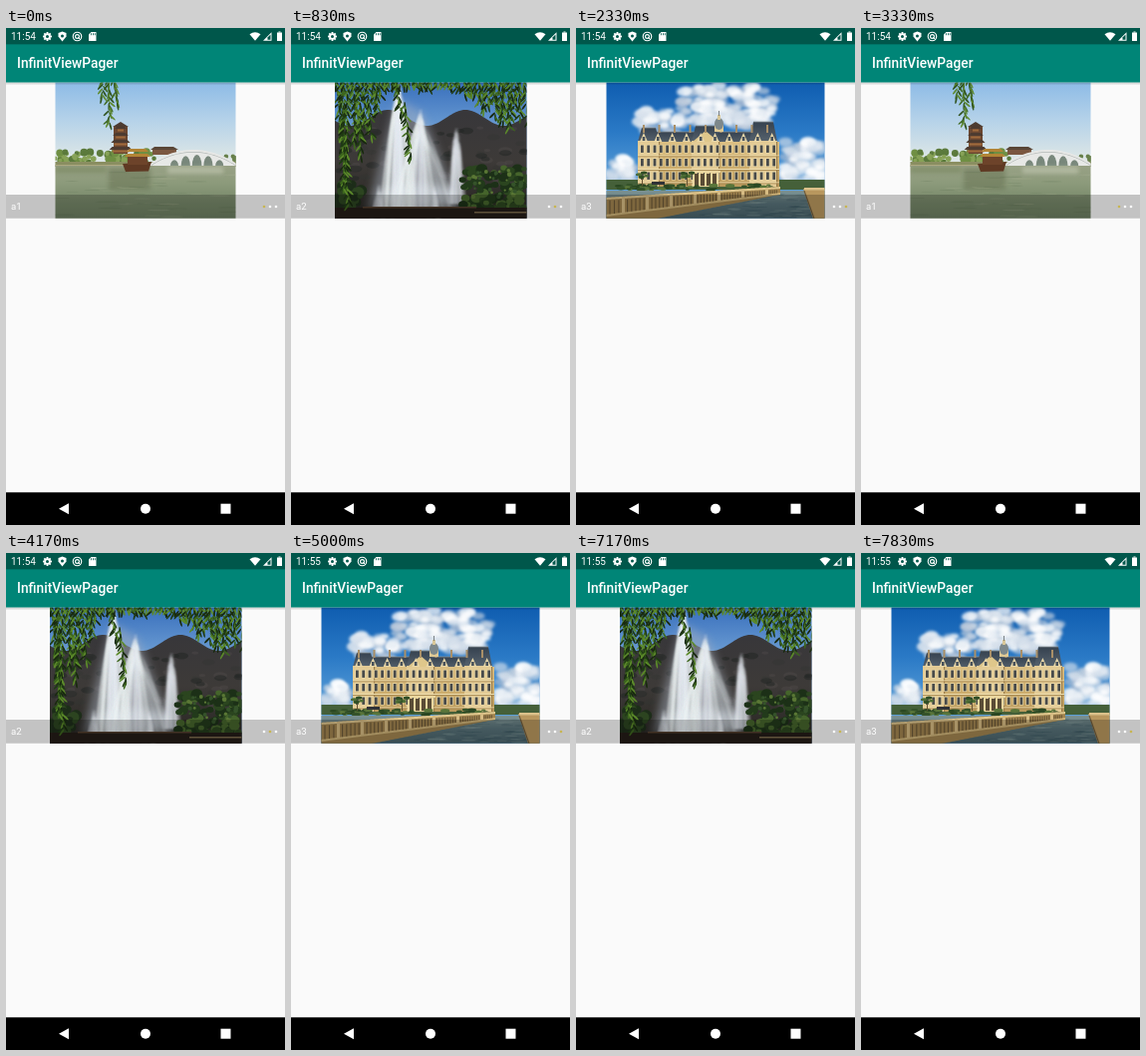
An HTML page with a canvas that plays this animation: 280x498 px, repeating every 8 s.

```html
<!DOCTYPE html>
<html lang="en">
<head>
<meta charset="utf-8">
<title>InfinitViewPager</title>
<style>
html, body { margin: 0; width: 100%; height: 100%; overflow: hidden; background: #fafafa; }
#stage { position: relative; width: 280px; height: 498px; overflow: hidden; font-family: Roboto, sans-serif; color: #fff; }
canvas { position: absolute; left: 0; top: 0; }
span { position: absolute; line-height: 16px; white-space: pre; }
#clock { left: 5px; top: 1px; font-size: 10px; }
#title { left: 11px; top: 27px; font-size: 13.75px; font-weight: 500; }
#label { left: 5px; top: 170.5px; font-size: 9.6px; }
</style>
</head>
<body>
<div id="stage">
  <canvas id="view" width="280" height="498"></canvas>
  <span id="clock">11:54</span>
  <span id="title">InfinitViewPager</span>
  <span id="label">a1</span>
</div>
<script>
const W = 280, H = 498;
const DP = W / 411;
const STATUS = 24 * DP, TOP = 80 * DP, BOTTOM = 280 * DP, STRIP = 167, NAV = H - 48 * DP;
const LOOP = 8000, FPS = 6, FIRST = 545, PERIOD = 980, SLIDE = 200, MINUTE = 5000;
const DARK = '#00574b';
const byId = id => document.getElementById(id);
const view = byId('view').getContext('2d');
let g = view;

function rect(color, x, y, w, h) {
  g.fillStyle = color;
  g.fillRect(x, y, w, h);
}
function poly(color, ...p) {
  g.fillStyle = color;
  g.beginPath();
  for (let i = 0; i < p.length; i += 2) g.lineTo(p[i], p[i + 1]);
  g.fill();
}
function oval(color, x, y, rx, ry = rx, angle = 0) {
  g.fillStyle = color;
  g.beginPath();
  g.ellipse(x, y, rx, ry, angle, 0, 7);
  g.fill();
}
function line(color, width, x0, y0, x1, y1) {
  g.strokeStyle = color;
  g.lineWidth = width;
  g.beginPath();
  g.moveTo(x0, y0);
  g.lineTo(x1, y1);
  g.stroke();
}
function repeat(n, draw) {
  for (let i = 0; i < n; i++) draw(i);
}
function shade(y0, y1, ...colors) {
  const s = g.createLinearGradient(0, y0, 0, y1);
  colors.forEach((c, i) => s.addColorStop(i / (colors.length - 1), c));
  return s;
}
function blurred(px, draw) {
  g.save();
  g.filter = `blur(${px}px)`;
  draw();
  g.restore();
}
function random(seed) {
  seed *= 7919;
  return () => (seed = (seed * 16807) % 2147483647) / 2147483647;
}
// Fills between two curves over a range of x
function band(color, x0, x1, top, bottom) {
  g.fillStyle = color;
  g.beginPath();
  for (let x = x0; x <= x1; x++) g.lineTo(x, top(x));
  for (let x = x1; x >= x0; x--) g.lineTo(x, bottom(x));
  g.fill();
}
function scatter(n, colors, x, y, w, h, rx, ry = rx) {
  const r = random(n + x);
  repeat(n, i => {
    const k = 0.5 + r() * 0.7;
    oval(colors[i % colors.length], x + r() * w, y + r() * h, rx * k, ry * k);
  });
}
// A hanging twig whose narrow leaves droop to both sides
function willow(x, y, length, drift, colors) {
  const r = random(x + length);
  for (let d = 0, i = 0; d < length; d += 2.2, i++) {
    const angle = (r() - 0.5) * 1.8;
    oval(colors[i % colors.length], x + drift * d + Math.sin(angle) * 4, y + d, 0.9, 4, -angle);
  }
}

function lake() {
  rect(shade(TOP, 130, '#8dbbe6', '#b5d2e9', '#dce6e6'), 49, 54, 182, 84);
  scatter(60, ['#6f8f43', '#87a257', '#5b7a3c'], 49, 124, 100, 11, 3.5);
  scatter(18, ['#7d8c60', '#67804b'], 196, 128, 36, 7, 3);
  rect('#8b8f62', 49, 134, 182, 5);
  rect('#b4ad86', 49, 137, 95, 1.5);

  rect('#6b4731', 108, 99, 14, 27);
  repeat(4, i => {
    const y = 99 + i * 7, half = 6 + i * 1.8;
    poly('#4d3b30', 115 - half, y + 2, 118 - half, y - 1, 112 + half, y - 1, 115 + half, y + 2);
    rect('#a06b3c', 118 - half, y + 2.5, half * 2 - 6, 2);
  });
  poly('#4d3b30', 107, 99, 115, 94, 123, 99);
  rect('#7b5740', 147, 122, 24, 5);
  poly('#594536', 145, 122, 149, 119, 168, 119, 173, 122);

  const deck = x => 122 + (x - 188) ** 2 / 135;
  band('#e7e8e6', 143, 231, deck, () => 138);
  repeat(5, i => {
    const off = (i - 2) ** 2;
    oval('#78877b', 169 + i * 11.3, 138, 4.8 - off * 0.2, 11 - off * 1.3);
  });
  band('#b4b9b7', 146, 231, x => deck(x) + 2, x => deck(x) + 2.7);

  rect(shade(138, BOTTOM, '#98a185', '#8c9a7b', '#78896a', '#6b7d60'), 49, 138, 182, 53);
  blurred(2, () => {
    rect('#5d664866', 103, 140, 42, 22);
    rect('#d0d5c077', 162, 139, 56, 7);
    rect('#66784a66', 49, 139, 52, 6);
  });
  scatter(45, ['#b2bb9b33', '#53674533'], 49, 143, 182, 46, 10, 0.6);

  poly('#5f3923', 117, 136, 146, 134, 143, 143.5, 120, 144);
  rect('#6d432a', 122, 127, 20, 10);
  repeat(2, i => poly('#b28435', 121 - i * 2, 124 + i * 5, 124 - i * 2, 121 + i * 5,
    140 + i * 2, 121 + i * 5, 143 + i * 2, 124 + i * 5));

  const leaf = ['#416b25', '#5f8a32', '#315420'];
  repeat(3, i => willow(98 + i * 5, TOP, [18, 46, 26][i], i * 0.12 - 0.1, leaf));
}

// Water thrown up at one point, spreading as it falls
function plume(x, top, base, spread, n) {
  const r = random(x);
  g.strokeStyle = '#f0f5fa2c';
  g.lineWidth = 2.4;
  repeat(n, () => {
    const u = r() + r() - 1, y = top + Math.abs(u) * 25 + r() * 20;
    g.beginPath();
    g.moveTo(x + u * 5, y);
    g.quadraticCurveTo(x + u * spread * 0.6, y + 20, x + u * spread, base);
    g.stroke();
  });
}

function fountain() {
  rect(shade(TOP, 100, '#3970bd', '#6a9bd2'), 44, 54, 193, 137);
  const ridge = x => 90 - 8 * Math.cos((x - 175) / 12.3);
  band(shade(85, 180, '#38373a', '#3d3a38', '#2a2824'), 44, 237, ridge, () => 191);
  scatter(90, ['#23262488', '#55505055', '#30353055'], 46, 100, 190, 60, 6, 3);

  blurred(4, () => {
    poly('#a9b3c077', 106, 70, 132, 85, 172, 182, 76, 182);
    oval('#cbd3dd99', 126, 168, 40, 12);
  });
  blurred(0.8, () => {
    plume(108, 54, 182, 20, 110);
    plume(130, 80, 182, 38, 100);
    plume(166, 97, 176, 12, 45);
    plume(88, 154, 182, 18, 30);
    plume(144, 156, 182, 12, 30);
  });

  scatter(110, ['#2b451f', '#1c3017', '#45642b', '#223a1b'], 172, 140, 64, 40, 5, 4);
  scatter(30, ['#5a7735', '#35532a'], 181, 142, 50, 28, 2);
  scatter(30, ['#1d2d19', '#2c4420'], 44, 156, 28, 24, 5);
  rect('#241c17', 44, 180, 193, 11);
  rect('#54402f', 72, 179, 114, 1.5);
  rect('#7a684c', 184, 184, 53, 1.5);

  const leaf = ['#1f3a14', '#3d661d', '#5c8a2a', '#18290f'];
  const r = random(12);
  for (let x = 45; x < 237; x += 4) {
    const reach = Math.max(135 - (x - 44) * 2.5, (x - 145) * 0.65, 9);
    willow(x, TOP, reach * (0.55 + r() * 0.55), r() * 0.2 - 0.05, leaf);
  }
  willow(104, TOP, 36, 0.2, leaf);
  willow(114, 78, 56, 0.12, leaf);
}

function cloud(x, y, w, h) {
  const n = Math.round(w * h / 45);
  blurred(1.6, () => {
    scatter(n, ['#a9bdd5aa', '#c4d1e0aa'], x, y + 3, w, h, 7, 4);
    scatter(n + 1, ['#e9eff5cc', '#d3deeaaa', '#ffffffcc'], x + 2, y, w - 4, h - 3, 7, 4.5);
  });
}
function mansard(x, y, w, base) {
  poly(shade(y, base, '#35414f', '#57636e'), x, base, x + 4, y, x + w - 4, y, x + w, base);
  line('#8d9698', 0.8, x + 4, y, x + w - 4, y);
}

function palace() {
  rect(shade(TOP, 155, '#0f5db0', '#2b7ac6', '#5b9fd8'), 30, 54, 220, 137);
  cloud(106, 56, 94, 42);
  cloud(60, 82, 48, 20);
  cloud(207, 114, 42, 40);
  cloud(30, 130, 30, 24);

  rect('#456039', 30, 152, 220, 10);
  mansard(64, 104, 138, 116);
  rect(shade(113, 160, '#dcc084', '#cfb070', '#b8975a'), 62, 114, 142, 45);
  const wings = [[62, 22, 100], [116, 28, 98], [174, 28, 94]];
  wings.forEach(([x, w, y]) => {
    mansard(x, y, w, 114);
    rect('#e3cb95', x, 113, w, 46);
    rect('#9b7d4a', x + w - 1, 114, 1.2, 45);
  });
  poly('#dfc78b', 117, 114, 130, 103, 143, 114);
  repeat(10, i => {
    const x = 66 + i * 14.3;
    poly('#e9d7a8', x - 2, 114, x + 2, 105, x + 6, 114);
    rect('#48515a', x + 0.7, 109, 2.6, 4);
  });
  repeat(9, i => rect('#a98f68', 67 + i * 15.5, 97, 2, 8));
  repeat(3, row => {
    const y = 117.5 + row * 13.5;
    rect('#f0e0b0', 62, y + 10, 142, 1);
    rect('#a1824c', 62, y + 11, 142, 0.8);
    repeat(22, i => {
      const x = 65 + i * 6.3;
      rect('#f0e0b0', x - 0.6, y - 0.6, 4, 8.6);
      rect('#484a4a', x, y, 2.8, 7.4);
    });
  });
  rect('#5a4c36', 118, 146, 24, 12);
  repeat(5, i => rect('#ead69e', 117 + i * 6, 145, 2, 14));
  rect('#ead69e', 113, 143, 32, 2);

  rect('#dfc995', 139, 97, 9, 7);
  oval('#7d888b', 143.5, 96, 4.5, 6);
  rect('#d9c899', 142, 87, 3, 5);
  line('#646a6d', 0.8, 143.5, 83, 143.5, 88);

  scatter(60, ['#35532a', '#59753a', '#2a4722'], 42, 157, 162, 5, 4, 1.7);
  [66, 111].forEach(x => {
    rect('#655332', x, 149, 1, 9);
    scatter(9, ['#2f4d25', '#4e6e35'], x - 5, 145, 11, 5, 3, 1.5);
  });
  rect('#303236', 76, 154, 13, 3);

  rect(shade(162, BOTTOM, '#7f9595', '#587279', '#48626a'), 30, 163, 220, 28);
  scatter(80, ['#93a7a444', '#2f4c5744'], 130, 166, 105, 24, 8, 0.8);

  // Balustrade receding to the right
  const rail = x => 170 - (x - 30) * 11 / 175;
  const foot = x => 187 - (x - 30) * 22 / 175;
  band('#a1844f', 30, 205, rail, x => Math.min(191, foot(x) + 14 - (x - 30) * 0.07));
  band('#e0c88f', 30, 205, rail, x => rail(x) + 2);
  band('#cfb47a', 30, 205, foot, x => foot(x) + 2);
  for (let x = 34, gap = 4.5; x < 203; x += gap, gap *= 0.985) {
    line('#6b5838', 1.1, x, rail(x) + 3, x, foot(x));
  }
  for (let x = 46; x < 204; x += 24) rect('#d6bb83', x, rail(x), 3, foot(x) - rail(x));
  poly('#b8975e', 228, 161, 250, 161, 250, 191, 238, 191);
  rect('#dbc18a', 229, 160, 21, 2.5);
  line('#6f5c3d', 1.2, 229, 163, 239, 191);
}

function photo(draw, x, w) {
  const c = document.createElement('canvas');
  c.width = W;
  c.height = 192;
  g = c.getContext('2d');
  g.beginPath();
  g.rect(x, TOP, w, BOTTOM - TOP);
  g.clip();
  draw();
  return c;
}
const pages = [photo(lake, 49.5, 181), photo(fountain, 44, 192.5), photo(palace, 30.5, 219)];
g = view;

function statusIcons() {
  repeat(4, i => {
    const a = i * Math.PI / 4, dx = Math.cos(a) * 4.5, dy = Math.sin(a) * 4.5;
    line('#fff', 1.8, 41.5 - dx, 8.5 - dy, 41.5 + dx, 8.5 + dy);
  });
  oval('#fff', 41.5, 8.5, 3.3);
  oval(DARK, 41.5, 8.5, 1.5);

  poly('#fff', 56.5, 3.5, 60.5, 5, 60.5, 8.5, 56.5, 13.5, 52.5, 8.5, 52.5, 5);
  oval(DARK, 56.5, 8, 1.5);

  ['#fff', DARK, '#fff', DARK].forEach((c, i) => oval(c, 71.5, 8.5, 4.8 - i * 1.15));
  line('#fff', 1, 72.5, 9.5, 75, 12);

  poly('#fff', 83, 6.5, 85.5, 4, 90.5, 4, 90.5, 13, 83, 13);
  repeat(3, i => rect(DARK, 85.2 + i * 1.8, 5.2, 0.8, 2));

  g.fillStyle = '#fff';
  g.beginPath();
  g.moveTo(250, 12.8);
  g.lineTo(244.5, 6.2);
  g.quadraticCurveTo(250, 2.2, 255.5, 6.2);
  g.fill();
  poly('#fff', 258, 12.8, 266.5, 4.2, 266.5, 12.8);
  poly(DARK, 262.5, 11.8, 262.5, 9.6, 265.5, 6.6, 265.5, 11.8);
  rect('#fff', 272, 4.5, 5, 8.5);
  rect('#fff', 273.5, 3.5, 2, 1);
}

function chrome(current) {
  rect('#00000038', 0, STRIP, W, BOTTOM - STRIP);
  repeat(3, i => oval(i === current ? '#c7b552' : '#fff', 259 + i * 6, 179, 1.3));
  rect(shade(TOP, TOP + 3, '#00000030', '#00000000'), 0, TOP, W, 3);
  rect('#008577', 0, 0, W, TOP);
  rect(DARK, 0, 0, W, STATUS);
  statusIcons();
  rect('#000', 0, NAV, W, H - NAV);
  poly('#fff', 53, 481.7, 63, 476.2, 63, 487.2);
  oval('#fff', 140, 481.7, 5);
  rect('#fff', 215.5, 476.7, 10, 10);
}

function draw(t) {
  const turns = Math.max(0, Math.floor((t - FIRST) / PERIOD) + 1);
  const began = FIRST + (turns - 1) * PERIOD;
  const p = turns ? Math.min(1, (t - began) / SLIDE) : 1;
  const eased = 1 + (p - 1) ** 5;
  const current = turns % 3;

  rect('#fafafa', 0, 0, W, H);
  if (eased < 1) view.drawImage(pages[(turns + 2) % 3], Math.round(-W * eased), 0);
  view.drawImage(pages[current], Math.round(W * (1 - eased)), 0);
  chrome(current);
  byId('label').textContent = 'a' + (current + 1);
  byId('clock').textContent = t < MINUTE ? '11:54' : '11:55';
}

const start = performance.now();
let shown = -1;
function tick() {
  const t = Math.max(0, performance.now() - start) % LOOP;
  const step = Math.min(LOOP * FPS / 1000 - 1, Math.floor((t + 4) * FPS / 1000));
  if (step !== shown) draw((shown = step) * 1000 / FPS);
  requestAnimationFrame(tick);
}
tick();
</script>
</body>
</html>
```
